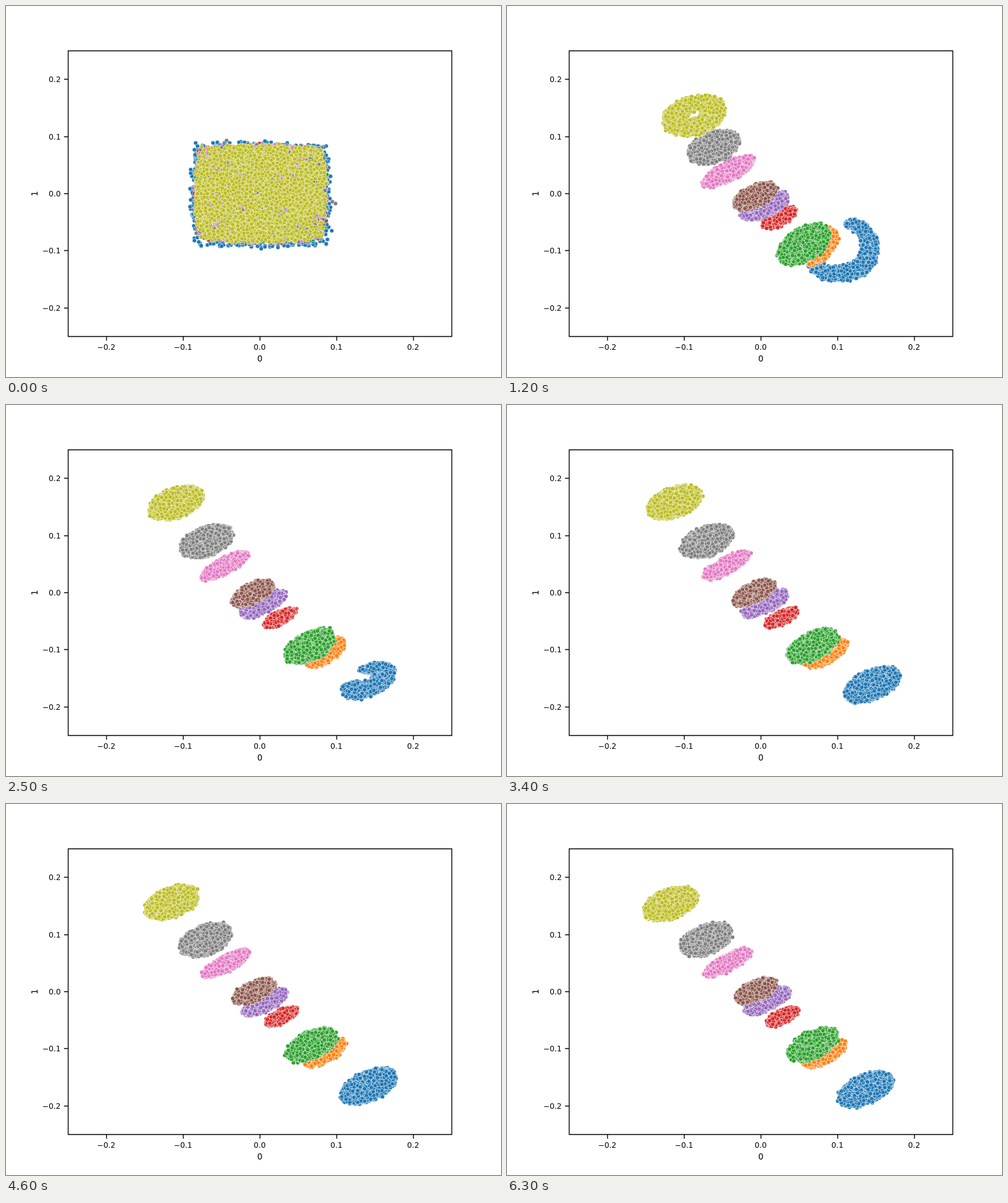
Animation, 800 px wide and 600 px high, one loop 6400 ms. Source, as an HTML page with a canvas:

```html
<!DOCTYPE html>
<html lang="en">
<head>
<meta charset="utf-8">
<title>Embedding scatter</title>
<style>
  html, body { margin: 0; width: 800px; height: 600px; overflow: hidden; background: #fff; }
  canvas, svg { position: absolute; left: 0; top: 0; display: block; }
  text { font-family: "DejaVu Sans", sans-serif; font-size: 12.2px; fill: #000; }
  .label { font-size: 13.3px; }
  path { fill: none; stroke: #000; stroke-width: 1.39; }
</style>
</head>
<body>
<canvas id="plot" width="800" height="600"></canvas>
<svg id="axes" width="800" height="600"></svg>
<script>
const STEP = 100, STEPS = 64, TAU = Math.PI * 2, RAD = Math.PI / 180;
const AIM = 42 * RAD; // the side on which the blue ring closes up

// pose: x, y, half width, half height, tilt, hole, angular spread, squareness
// Poses with only x, y take their shape from the end pose.
const clusters = [
  { color: '#1f77b4', n: 1900, ring: [452, 336, 100, 77, 3, .7, 1, .2],
    split: [533, 384, 88, 77, 0, .7, .3, .25], settle: [590, 452], end: [579, 461, 46, 22, -24] },
  { color: '#ff7f0e', n: 900, ring: [464, 364, 52, 29, -24],
    split: [516, 397, 32, 18, -55], settle: [516, 401], end: [514, 403, 37, 13, -29] },
  { color: '#2ca02c', n: 1500, ring: [465, 364, 57, 32, -28],
    split: [484, 392, 42, 23, -32], settle: [493, 389], end: [494, 389, 43, 20, -26] },
  { color: '#d62728', n: 650, ring: [439, 333, 35, 23, -28],
    split: [439, 344], settle: [443, 344], end: [445, 343, 27, 9, -27] },
  { color: '#9467bd', n: 1000, ring: [428, 322, 43, 25, -22],
    split: [411, 323], settle: [416, 321], end: [420, 318, 39, 13, -26] },
  { color: '#8c564b', n: 1200, ring: [412, 311, 39, 18, -24],
    split: [396, 306], settle: [399, 303], end: [402, 301, 35, 14, -26] },
  { color: '#e377c2', n: 1000, ring: [379, 283, 58, 21, -27],
    split: [350, 262], settle: [354, 259], end: [356, 256, 41, 11, -28] },
  { color: '#7f7f7f', n: 1500, ring: [352, 248, 42, 24, -20],
    split: [327, 221], settle: [322, 220], end: [321, 219, 43, 22, -21] },
  { color: '#bcbd22', n: 2600, ring: [348, 229, 70, 50, -4, .56, 1, .15],
    split: [287, 159], settle: [270, 157], end: [264, 161, 44, 22, -20] }
];
const keys = [0, 7, 17, 34, 63];
const easeOut = p => 1 - (1 - p) * (1 - p);
const eases = [p => p, easeOut, easeOut, p => p];

function random(seed) {
  return () => {
    seed = seed + 0x6D2B79F5 | 0;
    let t = Math.imul(seed ^ seed >>> 15, 1 | seed);
    t = t + Math.imul(t ^ t >>> 7, 61 | t) ^ t;
    return ((t ^ t >>> 14) >>> 0) / 4294967296;
  };
}

function makeDot(color) {
  const dot = document.createElement('canvas');
  dot.width = dot.height = 9;
  const g = dot.getContext('2d');
  g.arc(4.5, 4.5, 3.33, 0, TAU);
  g.fillStyle = color;
  g.fill();
  g.strokeStyle = '#fff';
  g.lineWidth = .55;
  g.stroke();
  return dot;
}

const rnd = random(11);
clusters.forEach((c, i) => {
  const start = i ? [411, 303, 105, 78, 0, 0, 1, .8] : [411, 305, 113, 85, 0, 0, 1, .85];
  const shaped = pose => pose.concat(c.end.slice(pose.length));
  c.poses = [start, c.ring, shaped(c.split), shaped(c.settle), c.end];
  c.dot = makeDot(c.color);
  c.points = Array.from({ length: c.n }, () => ({ area: rnd(), turn: (rnd() * 2 - 1) * Math.PI }));
});

function place(turn, area, pose) {
  const [x, y, a, b, tilt, hole = 0, spread = 1, square = 0] = pose;
  const angle = AIM + turn * spread;
  const cos = Math.cos(angle), sin = Math.sin(angle);
  const r = Math.sqrt(hole * hole + (1 - hole * hole) * area)
    / Math.max(Math.abs(cos), Math.abs(sin)) ** square;
  const u = a * r * cos, v = b * r * sin;
  const ct = Math.cos(tilt * RAD), st = Math.sin(tilt * RAD);
  return [x + u * ct - v * st, y + u * st + v * ct];
}

const ctx = document.getElementById('plot').getContext('2d');

function draw(step) {
  let k = 0;
  while (k < keys.length - 2 && step >= keys[k + 1]) k++;
  const p = eases[k]((step - keys[k]) / (keys[k + 1] - keys[k]));
  const noise = random(900 + step * 7919);
  ctx.clearRect(0, 0, 800, 600);
  for (const c of clusters) {
    for (const { area, turn } of c.points) {
      const stray = noise() < .004 ? 1 + noise() * .45 : 1;
      const from = place(turn, area * stray, c.poses[k]);
      const to = place(turn, area * stray, c.poses[k + 1]);
      const jx = (noise() + noise() - 1) * 4, jy = (noise() + noise() - 1) * 4;
      ctx.drawImage(c.dot,
        Math.round(from[0] + (to[0] - from[0]) * p + jx) - 4,
        Math.round(from[1] + (to[1] - from[1]) * p + jy) - 4);
    }
  }
}

function drawAxes() {
  const text = (x, y, s, anchor, extra = '') =>
    `<text x="${x}" y="${y}" text-anchor="${anchor}" ${extra}>${s}</text>`;
  let d = 'M100.5 72.5H720.5V534.5H100.5Z', labels = '';
  for (let i = -2; i <= 2; i++) {
    const x = 410 + i * 124, y = Math.round(303 - i * 92.4);
    const s = (i < 0 ? '\u2212' : '') + (Math.abs(i) / 10).toFixed(1);
    d += `M${x + .5} 534.5v6.7M100.5 ${y + .5}h-6.7`;
    labels += text(x, 556, s, 'middle') + text(88.4, y + 5, s, 'end');
  }
  labels += text(410.3, 574.5, '0', 'middle', 'class="label"');
  labels += text(0, 0, '1', 'middle', 'class="label" transform="translate(51 303.5) rotate(-90)"');
  document.getElementById('axes').innerHTML = `<path d="${d}"/>` + labels;
}

let shown = -1;
const began = performance.now();
function tick() {
  const step = Math.floor((performance.now() - began) / STEP) % STEPS;
  if (step !== shown) draw(shown = step);
  requestAnimationFrame(tick);
}
drawAxes();
tick();
</script>
</body>
</html>
```
